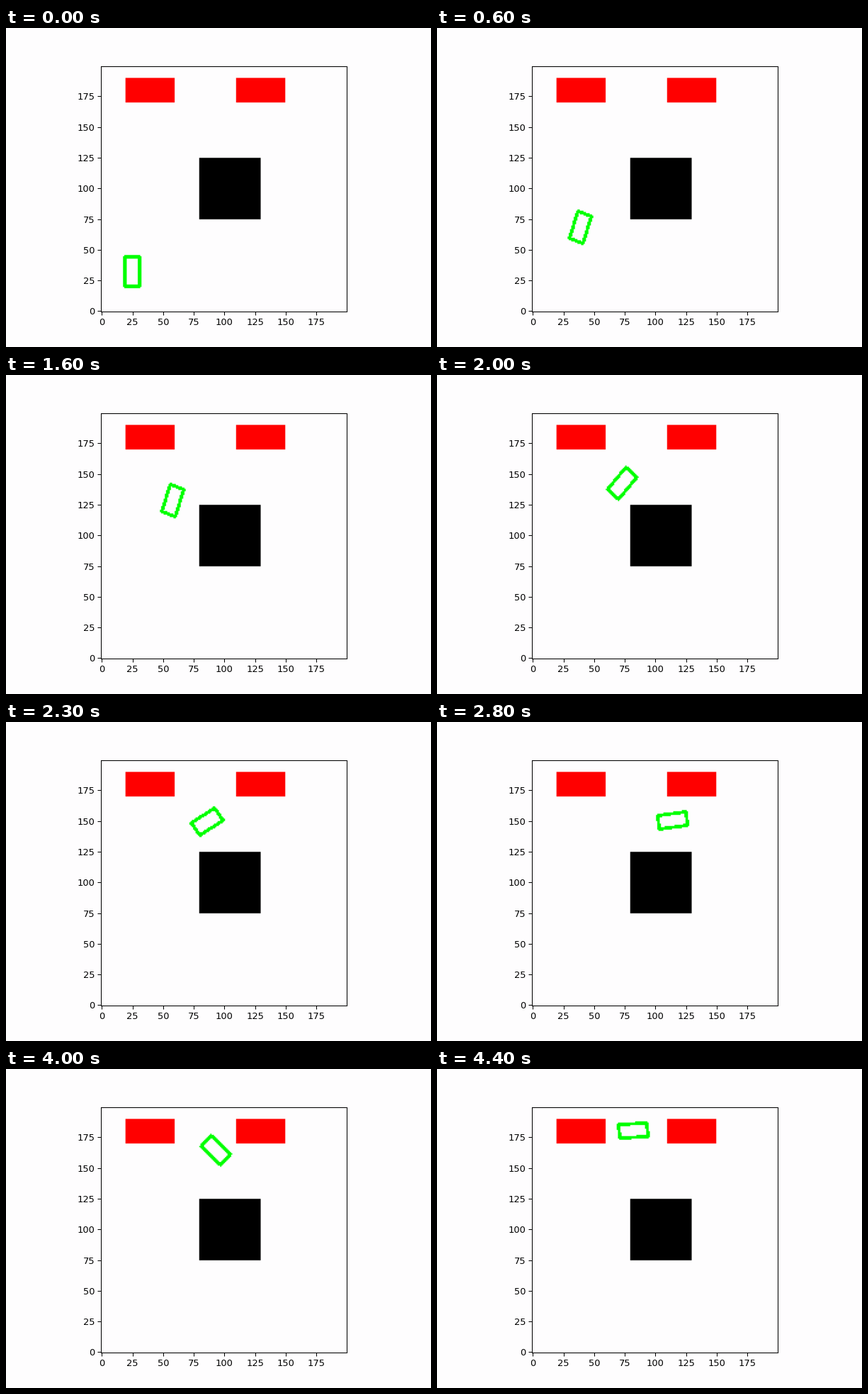
These frames come from a looping animation (600x450 px, 4.5 s). A matplotlib script:

```python
import numpy as np
import matplotlib.pyplot as plt
from matplotlib.animation import FuncAnimation

SIZE = 200
FRAMES, STEP = 45, 100
LENGTH, WIDTH, REACH = 24, 12, 1.4
PAPER = (254, 253, 254)
RED, BLACK, GREEN = (255, 0, 0), (0, 0, 0), (0, 255, 0)

# Key poses: time step, centre x, centre y, heading in degrees
FORWARD = np.array([(0, 25, 32, 90), (6, 39, 68, 74), (16, 58, 128, 74),
                    (23, 86, 149, 32), (31, 131, 149, -10)])
REVERSE = np.array([(31, 131, 149, -10), (33, 117, 149, -21),
                    (40, 93, 164, -43), (42, 84, 173, -23), (44, 82, 180, 3)])

plt.rcParams["font.family"] = "DejaVu Sans"
rows, cols = np.mgrid[:SIZE, :SIZE]


def build_scene():
    img = np.full((SIZE, SIZE, 3), PAPER, np.uint8)
    for left in (20, 110):
        img[170:190, left:left + 40] = RED
    img[75:125, 80:130] = BLACK
    return img


def hermite(t, times, values):
    """Smooth curve through the key values."""
    slopes = np.gradient(values, times)
    k = min(np.searchsorted(times, t, side="right"), len(times) - 1) - 1
    span = times[k + 1] - times[k]
    u = (t - times[k]) / span
    ease = u * u * (3 - 2 * u)
    return (values[k] + ease * (values[k + 1] - values[k])
            + span * u * (1 - u) * ((1 - u) * slopes[k] - u * slopes[k + 1]))


def car_corners(t):
    leg = FORWARD if t <= FORWARD[-1, 0] else REVERSE
    times, xs, ys, headings = leg.T
    centre = np.round([hermite(t, times, xs), hermite(t, times, ys)])
    a = np.radians(np.interp(t, times, headings))
    nose = LENGTH / 2 * np.array([np.cos(a), np.sin(a)])
    side = WIDTH / 2 * np.array([-np.sin(a), np.cos(a)])
    # Corner offsets are cut to whole cells
    return [centre + np.trunc(np.round(offset, 6)) for offset in
            (nose + side, nose - side, -nose - side, -nose + side)]


def draw_segment(img, p, q):
    """Colour every cell close to the segment from p to q."""
    dx, dy = q - p
    along = ((cols - p[0]) * dx + (rows - p[1]) * dy) / (dx * dx + dy * dy)
    along = np.clip(along, 0, 1)
    gap = np.hypot(cols - p[0] - along * dx, rows - p[1] - along * dy)
    img[gap <= REACH] = GREEN


scene = build_scene()
paper = tuple(c / 255 for c in PAPER)
fig, ax = plt.subplots(figsize=(6.4, 4.8), dpi=93.75, facecolor=paper)
fig.subplots_adjust(bottom=0.1105)
ax.set_facecolor(paper)
view = ax.imshow(scene, origin="lower")
ax.set_xticks(range(0, SIZE, 25))
ax.set_yticks(range(0, SIZE, 25))


def update(i):
    img = scene.copy()
    corners = car_corners(i)
    for p, q in zip(corners, corners[1:] + corners[:1]):
        draw_segment(img, p, q)
    view.set_data(img)
    return [view]


anim = FuncAnimation(fig, update, frames=FRAMES, interval=STEP,
                     repeat=True, repeat_delay=0)
plt.show()
```
